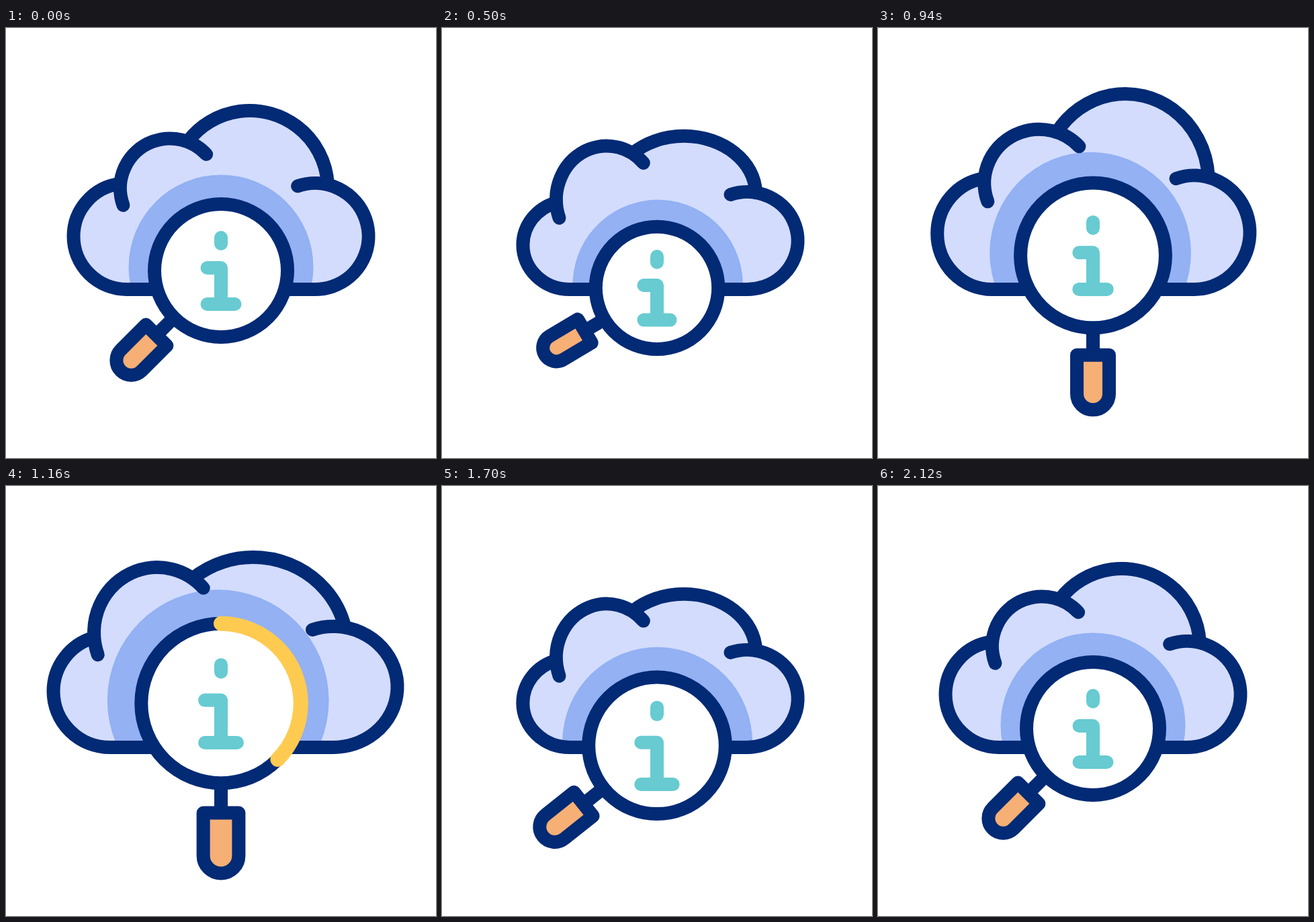
Animation of 640x640 px, one loop 2.28 s. Source, as an HTML page with a canvas:

```html
<!DOCTYPE html>
<html lang="en">
<head>
<meta charset="utf-8">
<title>Cloud search</title>
<style>
  html, body { margin: 0; width: 100%; height: 100%; overflow: hidden; background: #fff; }
  canvas { display: block; width: 640px; height: 640px; }
</style>
</head>
<body>
<canvas id="stage" width="640" height="640"></canvas>
<script>
const ctx = document.getElementById('stage').getContext('2d');
const LOOP = 2280, BASE = 389, CX = 320, TAU = Math.PI * 2;
const NAVY = '#022a75', PALE = '#d3dcfd', BLUE = '#93b1f3',
      TEAL = '#67cbd1', ORANGE = '#f6af74', YELLOW = '#fecb50';

const rad = deg => deg * Math.PI / 180;
const ease = v => (1 - Math.cos(Math.PI * Math.min(1, Math.max(0, v)))) / 2;
const mix = (a, b, k) => Array.isArray(a) ? a.map((v, i) => mix(v, b[i], k)) : a + (b - a) * k;

// Value at time t between eased [time, value] keys
function tween(keys, t) {
  const next = keys.findIndex(key => key[0] > t);
  if (next < 1) return keys[next < 0 ? keys.length - 1 : 0][1];
  const [t0, a] = keys[next - 1], [t1, b] = keys[next];
  return mix(a, b, ease((t - t0) / (t1 - t0)));
}

// Cloud lobes as [cx, cy, rx, ry]; the outer two stand on the base line
const onBase = (x, rx, ry) => [x, BASE - ry, rx, ry];
const cloud = (left, mid, big, right) => [onBase(...left), mid, big, onBase(...right)];
const rest   = cloud([180, 79.5, 79], [244, 238.5, 74, 74], [363, 239, 116, 116], [460, 79.5, 79]);
const squash = cloud([190.5, 70, 66], [245, 255.5, 75, 80], [360, 247, 107, 86], [454, 75.5, 72.5]);
const tall   = cloud([169, 82, 85.5], [243, 231, 81.5, 77.5], [372, 217, 122, 139], [471, 80, 86.5]);
const wide   = cloud([155, 84.5, 83.5], [225, 218, 94, 97], [368, 241, 140, 135], [487, 95.5, 90]);

const cloudKeys = [[200, rest], [490, squash], [860, mix(rest, tall, .6)], [1140, wide], [1220, wide],
                   [1400, tall], [1690, squash], [1900, rest]];
const scaleKeys = [[200, 1], [610, .906], [1180, 1.2], [1500, 1.232], [1760, 1]];
const yKeys = [[200, 361], [480, 387], [1160, 323.5], [1500, 321.5], [1690, 386.5], [1900, 361]];
const turnKeys = [[200, 45], [470, 60], [890, 0], [1520, 0], [1730, 54], [2000, 45]];

function stroke(color = NAVY, width = 20) {
  ctx.strokeStyle = color;
  ctx.lineWidth = width;
  ctx.stroke();
}

function fill(color) {
  ctx.fillStyle = color;
  ctx.fill();
}

function circle(x, y, r) {
  ctx.beginPath();
  ctx.arc(x, y, r, 0, TAU);
}

function arc([x, y, rx, ry], from, to) {
  ctx.ellipse(x, y, rx, ry, 0, from, to);
}

// Angle at which the outline of one lobe comes out of another
function exitAngle([x, y, rx, ry], [ox, oy, orx, ory], from, step) {
  const inside = a => Math.hypot((x + rx * Math.cos(a) - ox) / orx, (y + ry * Math.sin(a) - oy) / ory) < 1;
  let angle = rad(from);
  while (inside(angle)) angle += step;
  return angle;
}

function drawCloud(lobes, y, s, turn) {
  const [left, mid, big, right] = lobes;
  ctx.beginPath();
  for (const lobe of lobes) {
    ctx.moveTo(lobe[0] + lobe[2], lobe[1]);
    arc(lobe, 0, TAU);
  }
  ctx.rect(left[0], mid[1], right[0] - left[0], BASE - mid[1]);
  fill(PALE);

  ctx.save();
  ctx.clip();
  ctx.translate(CX, y);
  ctx.rotate(turn);
  circle(-3.6 * s, -3.6 * s, 137.5 * s);
  fill(BLUE);
  ctx.restore();

  ctx.beginPath();
  arc(big, exitAngle(big, mid, 195, .01), exitAngle(big, right, 365, -.01));
  stroke();
  ctx.beginPath();
  arc(mid, rad(160), rad(317));
  stroke();
  ctx.beginPath();
  arc(right, rad(251), rad(450));
  arc(left, rad(90), exitAngle(left, mid, 300, -.01));
  stroke();
}

function drawHandle(s, turn) {
  const w = 22 * s, top = 136 * s;
  ctx.save();
  ctx.rotate(turn);
  ctx.beginPath();
  ctx.moveTo(0, 99 * s);
  ctx.lineTo(0, top);
  stroke();
  ctx.beginPath();
  ctx.moveTo(-w, top);
  ctx.lineTo(w, top);
  ctx.arc(0, 189 * s, w, 0, Math.PI);
  ctx.closePath();
  fill(ORANGE);
  stroke();
  ctx.restore();
}

function drawInfo(s) {
  const line = (...points) => points.forEach(([x, y], i) => ctx[i ? 'lineTo' : 'moveTo'](x * s, y * s));
  ctx.beginPath();
  line([0, -49], [0, -40]);
  line([-20.5, -4], [0, -4], [0, 50]);
  line([-20.5, 50], [20.5, 50]);
  stroke(TEAL);
}

function drawProgress(t, r) {
  const from = ease((t - 1180) / 310), to = ease((t - 985) / 420);
  if (to <= from) return;
  ctx.beginPath();
  ctx.arc(0, 0, r, (from - .25) * TAU, (to - .25) * TAU);
  stroke(YELLOW, 22);
}

function draw() {
  const t = performance.now() % LOOP;
  const s = tween(scaleKeys, t), y = tween(yKeys, t), turn = rad(tween(turnKeys, t));
  ctx.clearRect(0, 0, 640, 640);
  ctx.lineCap = ctx.lineJoin = 'round';
  drawCloud(tween(cloudKeys, t), y, s, turn);

  ctx.save();
  ctx.translate(CX, y);
  drawHandle(s, turn);
  circle(0, 0, 99 * s);
  fill('#fff');
  stroke();
  drawProgress(t, 99 * s);
  drawInfo(tween(scaleKeys, t - 100));
  ctx.restore();
  requestAnimationFrame(draw);
}
draw();
</script>
</body>
</html>
```
